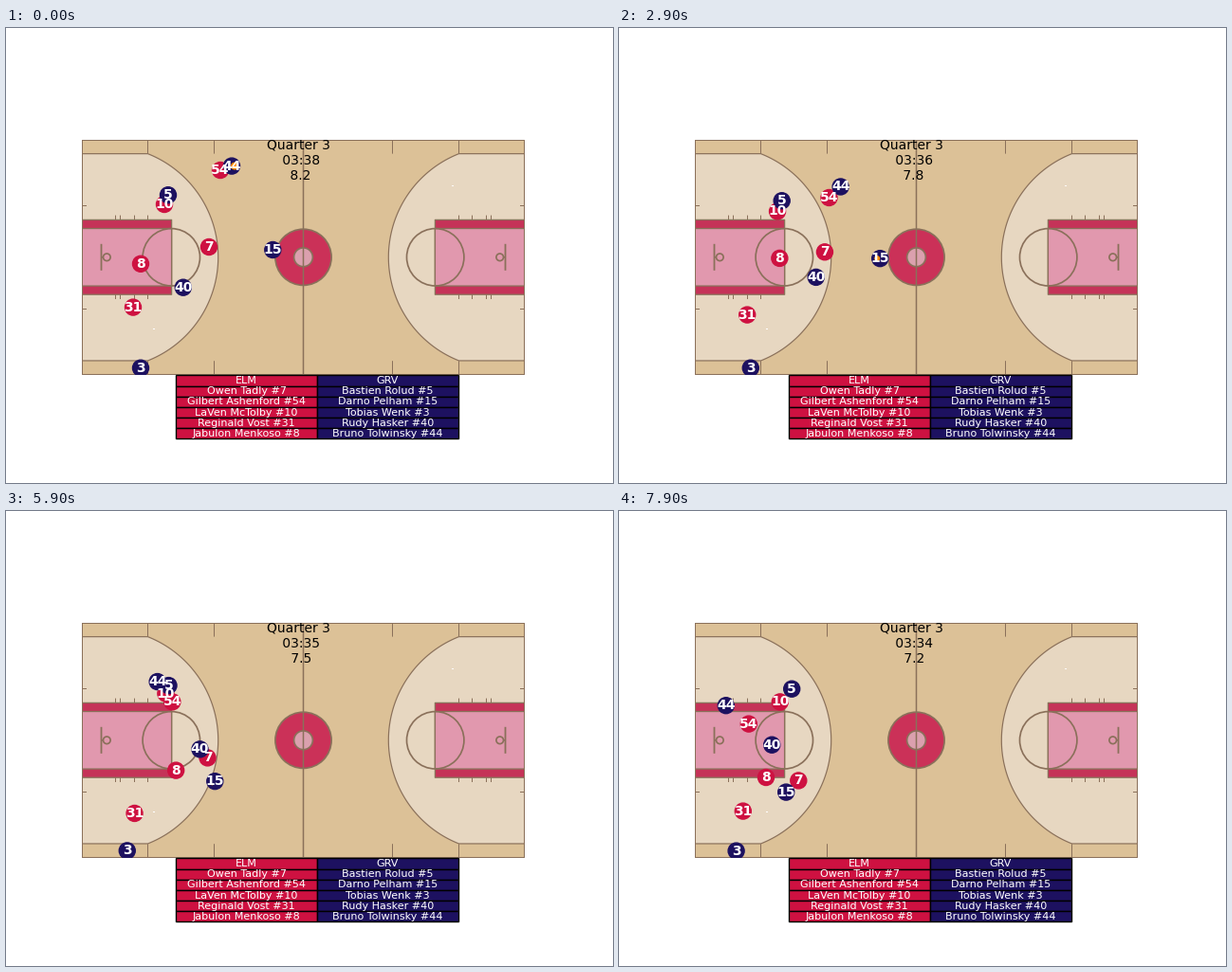
Animation of 640x480 px, one loop 8 s. Source, as a matplotlib script:

```python
import matplotlib.pyplot as plt
import numpy as np
from matplotlib.animation import FuncAnimation
from matplotlib.patches import Circle, Polygon, Rectangle

W, H, DPI = 640, 480, 100
FRAMES, STEP = 80, 100
RED, NAVY, ORANGE = "#ce1141", "#1d1160", "#ff8c00"
WOOD, PALE, PINK, BAND = "#dcc197", "#e7d7c1", "#e198ae", "#c53358"
LINE = "#8a705a"
FOOT = 4.96                                   # pixels per foot
LEFT, RIGHT, TOP, BOTTOM = 80, 547, 118, 366
MID_X, MID_Y = (LEFT + RIGHT) / 2, 241.8
BASE = 366.4                                  # bottom edge of the plot area

fig = plt.figure(figsize=(W / DPI, H / DPI), dpi=DPI, facecolor="white")
ax = fig.add_axes([0, 0, 1, 1])
ax.set(xlim=(0, W), ylim=(H, 0))
ax.axis("off")


def box(x0, y0, x1, y1, **style):
    return ax.add_patch(Rectangle((x0, y0), x1 - x0, y1 - y0, **style))


def line(xs, ys, width=1.0):
    ax.plot(xs, ys, color=LINE, lw=width * 0.72, solid_capstyle="butt",
            zorder=1, snap=False)


def ring(x, y, r, width=1.7, fill="none"):
    ax.add_patch(Circle((x, y), r, fc=fill, ec=LINE, lw=width * 0.72))


def draw_half(side):
    """One end of the court; side is 1 for the left and -1 for the right."""
    def fx(x):
        return MID_X + side * (np.asarray(x) - MID_X)

    hoop, radius, lane = 106.3, 117.4, 174.6
    bend = np.arccos((149.5 - hoop) / radius)
    a = np.linspace(-bend, bend, 90)
    xs = fx(np.r_[LEFT, hoop + radius * np.cos(a), LEFT])
    ys = MID_Y + radius * np.sin(np.r_[-bend, a, bend])
    ax.add_patch(Polygon(np.c_[xs, ys], fc=PALE, ec="none"))
    line(xs, ys, 1.2)

    for half, color in ((39.4, BAND), (30.3, PINK)):
        y0, y1 = MID_Y - half, MID_Y + half
        box(fx(LEFT), y0, fx(lane), y1, fc=color, ec="none")
        line(fx([LEFT, lane, lane, LEFT]), [y0, y0, y1, y1], 1.3)
    for x in (115.5, 120.5, 135.5, 149.5):
        for s in (-1, 1):
            line(fx([x, x]), MID_Y + s * np.array([39.4, 44.2]))

    ring(fx(174.3), MID_Y, 30.2)
    ring(fx(hoop), MID_Y, 3.8)
    line(fx([100.5, 100.5]), [MID_Y - 14, MID_Y + 14], 1.8)
    line(fx([100.5, 102.8]), [MID_Y, MID_Y], 1.5)

    for x in (149.5, 219.5):
        line(fx([x, x]), [TOP, 132.6])
        line(fx([x, x]), [351.2, BOTTOM])
    for y in (187.5, 296.5):
        line(fx([LEFT, 85]), [y, y])


floor = box(LEFT, TOP, RIGHT, BOTTOM, fc=WOOD, ec="none")
draw_half(1)
draw_half(-1)
ring(MID_X, MID_Y, 29.6, fill="#cb3158")
ring(MID_X, MID_Y, 9.9, fill="#dba0ae")
line([MID_X, MID_X], [TOP, BOTTOM], 1.5)
x0, x1, y0, y1 = LEFT + 0.5, RIGHT - 0.5, TOP + 0.5, BOTTOM - 0.5
line([x0, x1, x1, x0, x0], [y0, y0, y1, y1, y0])
for x, y in ((156, 317.5), (471, 166)):
    box(x - 0.8, y - 0.5, x + 0.8, y + 0.5, fc="white", ec="none")


def cell(row, col, text, color):
    w, h = 30 * FOOT, 11.183
    x, y = LEFT + 20 * FOOT + col * w, BASE + row * h
    box(x, y, x + w, y + h, fc=color, ec="black", lw=1)
    ax.text(x + w / 2, y + h / 2, text, color="white", size=8,
            ha="center", va="center")


class Player:
    """A numbered disc on a cubic path through evenly timed points."""

    def __init__(self, number, color, points):
        times = np.linspace(0, 1, len(points))
        self.path = np.polyfit(times, points, len(points) - 1)
        self.disc = ax.add_patch(Circle((0, 0), 12 / 7 * FOOT, color=color, zorder=3))
        self.disc.set_clip_path(floor)
        self.label = ax.text(0, 0, str(number), color="white", size=10,
                             weight="bold", ha="center", va="center", zorder=5)

    def at(self, n):
        return np.polyval(self.path, n / (FRAMES - 1))

    def move(self, n):
        pos = self.at(n)
        self.disc.center = pos
        self.label.set_position(pos)


TEAMS = [
    ("ELM", RED, [
        ("Owen Tadly", 7, [(214, 231), (216.5, 235), (215.7, 254), (189.3, 284.4)]),
        ("Gilbert Ashenford", 54, [(226, 150), (224, 177), (187, 196), (136.8, 224.6)]),
        ("LaVen McTolby", 10, [(167, 186), (167, 193.5), (168, 192), (169.8, 201.4)]),
        ("Reginald Vost", 31, [(134, 294.6), (135, 301), (136, 316.6), (130.8, 316.6)]),
        ("Jabulon Menkoso", 8, [(142, 248.8), (167, 241), (180.7, 267.4), (155, 281)]),
    ]),
    ("GRV", NAVY, [
        ("Bastien Rolud", 5, [(171, 176.2), (172, 182), (170.5, 183.6), (182.2, 187.7)]),
        ("Darno Pelham", 15, [(281.3, 234), (278.3, 240), (234, 277), (176.2, 296.6)]),
        ("Tobias Wenk", 3, [(142, 358.7), (139.6, 358.7), (130, 358.4), (123.6, 358.6)]),
        ("Rudy Hasker", 40, [(186.8, 273.7), (206, 264), (210, 253.5), (161.2, 246.7)]),
        ("Bruno Tolwinsky", 44, [(238, 145.6), (238, 166.5), (177, 176), (112.8, 205.2)]),
    ]),
]

players = {}
for col, (team, color, roster) in enumerate(TEAMS):
    cell(0, col, team, color)
    for row, (name, number, points) in enumerate(roster, 1):
        cell(row, col, f"{name} #{number}", color)
        players[number] = Player(number, color, points)

ball = ax.add_patch(Circle((0, 0), 4, fc=ORANGE, ec="none", zorder=4))
ball.set_clip_path(floor)
clock = ax.text(LEFT + 46.1 * FOOT, BASE - 45.65 * FOOT, "", size=10, color="black",
                ha="center", va="center", zorder=6)


def ball_at(n):
    """A straight pass from 44 to 15, who then dribbles."""
    release, flight = 4, 15.6
    start = players[44].at(min(n, release)) + (3, 0)
    bounce = -9 * np.sin(2 * np.pi * (n - 29) / 32)
    hand = players[15].at(n) + (-3, bounce)
    return start + (hand - start) * np.clip((n - release) / flight, 0, 1)


def update(n):
    for player in players.values():
        player.move(n)
    ball.center = ball_at(n)
    ball.radius = np.interp(n, [16, 28, 52, 62], [4, 3, 2.8, 0])
    minutes, seconds = divmod(218 - (n + 22) // 25, 60)
    clock.set_text(f"Quarter 3\n {minutes:02d}:{seconds:02d}\n {8.22 - 0.013 * n:.1f}")
    return []


anim = FuncAnimation(fig, update, frames=FRAMES, interval=STEP,
                     repeat=True, repeat_delay=0, init_func=lambda: update(0))
plt.show()
```
